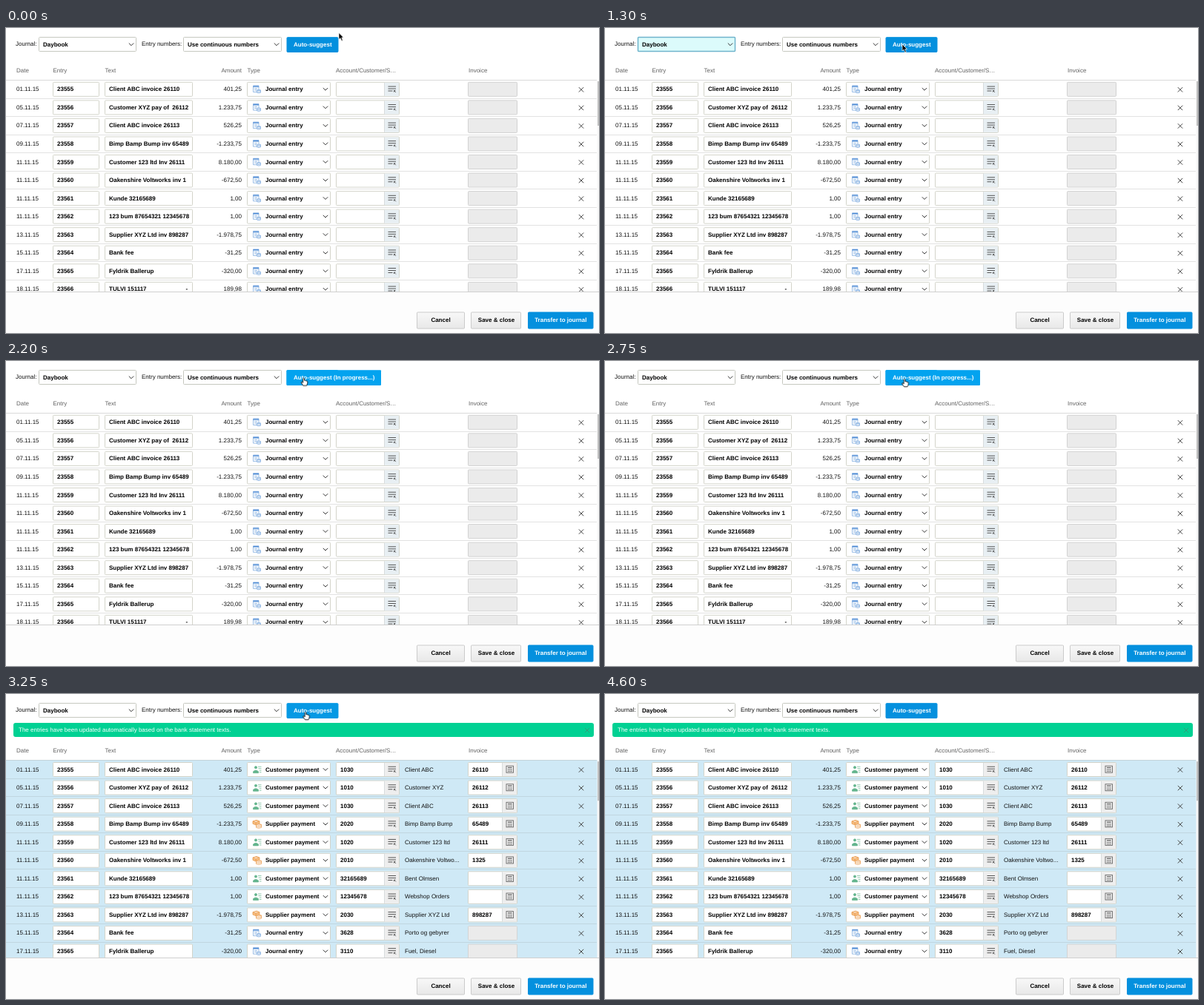
An HTML page for the animation above (4650 ms loop, 800x412 px).

```html
<!DOCTYPE html>
<html lang="en">
<head>
<meta charset="utf-8">
<title>Auto-suggest daybook entries</title>
<style>
  html, body { margin: 0; width: 100%; height: 100%; overflow: hidden; background: #fff; }
  svg { display: block; width: 800px; height: 412px; }
  text {
    font: 8px "Liberation Sans", Arial, sans-serif; fill: #111;
    white-space: pre; text-rendering: geometricPrecision;
  }
  .b { font-weight: bold; fill: #000; }
  .head { fill: #606060; }
  .white { fill: #fff; }
  .end { text-anchor: end; }
  .mid { text-anchor: middle; }
  .ln { fill: none; stroke: #333; }

  .before, .after, .focus, .button, .progress, .arrow, .hand {
    animation: 4650ms step-end infinite;
  }
  .before { animation-name: before; }
  .after { animation-name: after; }
  .focus { animation-name: focus; }
  .button { animation-name: button; }
  .progress { animation-name: progress; }
  .arrow { animation-name: arrow; }
  .hand { animation-name: hand; }
  .arrowPath { animation: arrowPath 4650ms linear infinite; }
  .handPath { animation: handPath 4650ms linear infinite; }

  @keyframes before { 0% { visibility: visible } 60.2%, 100% { visibility: hidden } }
  @keyframes after { 0% { visibility: hidden } 60.2%, 100% { visibility: visible } }
  @keyframes focus {
    0% { visibility: hidden } 12.9% { visibility: visible } 34.4%, 100% { visibility: hidden }
  }
  @keyframes button {
    0% { fill: #0490de; stroke: #0490de }
    30.1% { fill: #0599e4; stroke: #0599e4 }
    34.4% { fill: #38b8f0; stroke: #79cdf2 }
    44.08% { fill: #03a3ef; stroke: #03a3ef }
    60.2% { fill: #0599e4; stroke: #0599e4 }
    75%, 100% { fill: #0490de; stroke: #0490de }
  }
  @keyframes progress {
    0% { visibility: hidden } 44.08% { visibility: visible } 60.2%, 100% { visibility: hidden }
  }
  @keyframes arrow {
    0% { visibility: visible } 30.1% { visibility: hidden }
    75% { visibility: visible } 79%, 100% { visibility: hidden }
  }
  @keyframes hand {
    0% { visibility: hidden } 30.1% { visibility: visible } 75%, 100% { visibility: hidden }
  }
  @keyframes arrowPath {
    0% { transform: translate(449px, 6.5px) }
    12.9% { transform: translate(449px, 6.5px); animation-timing-function: ease-in-out }
    24%, 30.1% { transform: translate(401px, 22px) }
    75% { transform: translate(408px, 12px) }
    79%, 100% { transform: translate(412px, -16px) }
  }
  @keyframes handPath {
    0%, 48.4% { transform: translate(402px, 22.5px) }
    58%, 72% { transform: translate(404.5px, 24px) }
    75%, 100% { transform: translate(408px, 12px) }
  }
</style>
</head>
<body>
<svg id="stage" viewBox="0 0 800 412" xmlns="http://www.w3.org/2000/svg">
  <defs>
    <clipPath id="table"><rect y="40" width="800" height="316"/></clipPath>
    <linearGradient id="grey" x2="0" y2="1"><stop stop-color="#f8f8f8"/><stop offset="1" stop-color="#e8e8e8"/></linearGradient>
    <g id="journal" fill="#fff" stroke="#82aee0" stroke-width=".8">
      <path d="M.5 .5H8V9H.5ZM.5 2.4H8M2 4.5H6M2 6.5H5"/>
      <path d="M5.5 6.5V9.8Q8 11 10.5 9.8V6.5Q8 5.2 5.5 6.5Q8 7.8 10.5 6.5M5.5 8.2Q8 9.5 10.5 8.2"/>
      <path d="M.5 1.2H8" stroke="#4a88d4" stroke-width="1.2"/>
    </g>
    <g id="customer" fill="none" stroke="#62b48c" stroke-width=".7">
      <circle cx="4" cy="2.5" r="1.6" fill="#62b48c"/>
      <path d="M.5 10V8Q4 4.8 7.5 8V10Z" fill="#62b48c"/>
      <path d="M7 1.5H11.5M7.5 4H11.5M8.8 6.5H11.5M8.8 9H11.5"/>
    </g>
    <g id="supplier" fill="#fff" stroke="#ea9c50" stroke-width=".8">
      <path d="M0 1.5L5 0L9 1.5V5L4 6.5L0 5ZM0 1.5L4 3L9 1.5M4 3V6.5" fill="#f6bd80"/>
      <path d="M4.5 6V10Q8 11.8 11.5 10V6Q8 4.2 4.5 6Q8 7.8 11.5 6M4.5 8Q8 9.8 11.5 8"/>
    </g>
    <g id="list" fill="none" stroke="#444" stroke-width=".9">
      <path d="M0 0H10.5M0 3H10.5M0 6H6"/>
      <path d="M8 5.5L10.5 8M8 7.5V5.5H10" stroke-width=".8"/>
    </g>
    <g id="calc" fill="none" stroke="#666" stroke-width=".9">
      <rect width="9.5" height="9"/>
      <path d="M2 2.3H7.6" stroke-width="1.3"/>
      <path d="M2 5H7.6M2 7.2H7.6" stroke-width="1.2" stroke-dasharray="1.4 .7"/>
    </g>
  </defs>
</svg>
<script>
const rows = [
  ['01.11.15', 'Client ABC invoice 26110', '401,25', 'customer', '1030', 'Client ABC', '26110'],
  ['05.11.15', 'Customer XYZ pay of  26112', '1.233,75', 'customer', '1010', 'Customer XYZ', '26112'],
  ['07.11.15', 'Client ABC invoice 26113', '526,25', 'customer', '1030', 'Client ABC', '26113'],
  ['09.11.15', 'Bimp Bamp Bump inv 65489', '-1.233,75', 'supplier', '2020', 'Bimp Bamp Bump', '65489'],
  ['11.11.15', 'Customer 123 ltd Inv 26111', '8.180,00', 'customer', '1020', 'Customer 123 ltd', '26111'],
  ['11.11.15', 'Oakenshire Voltworks inv 1', '-672,50', 'supplier', '2010', 'Oakenshire Voltwo...', '1325'],
  ['11.11.15', 'Kunde 32165689', '1,00', 'customer', '32165689', 'Bent Olmsen', ''],
  ['11.11.15', '123 bum 87654321 12345678', '1,00', 'customer', '12345678', 'Webshop Orders', ''],
  ['13.11.15', 'Supplier XYZ Ltd inv 898287', '-1.978,75', 'supplier', '2030', 'Supplier XYZ Ltd', '898287'],
  ['15.11.15', 'Bank fee', '-31,25', 'journal', '3628', 'Porto og gebyrer'],
  ['17.11.15', 'Fyldrik Ballerup', '-320,00', 'journal', '3110', 'Fuel, Diesel'],
  ['18.11.15', 'TULVI 151117', '189,98', 'journal', '', '']
];
const labels = { journal: 'Journal entry', customer: 'Customer payment', supplier: 'Supplier payment' };

const text = (x, y, s, cls = '') => `<text x="${x}" y="${y + 2.8}" class="${cls}">${s.replace('&', '&amp;')}</text>`;
const rect = (x, y, w, h, fill, rest = '') => `<rect x="${x}" y="${y}" width="${w}" height="${h}" fill="${fill}" ${rest}/>`;
const box = (x, y, w, h, fill = '#fff', stroke = '#d3d4ca') =>
  rect(x + .5, y + .5, w - 1, h - 1, fill, `stroke="${stroke}" rx="1"`);
const icon = (id, x, y) => `<use href="#${id}" x="${x}" y="${y}"/>`;
const chevron = (x, y) => `<path class="ln" d="M${x - 3.2} ${y - 1.5}l3.2 3.2l3.2 -3.2"/>`;
const cross = (x, y, r, color) =>
  `<path d="M${x - r} ${y - r}l${2 * r} ${2 * r}m0 ${-2 * r}l${-2 * r} ${2 * r}" stroke="${color}"/>`;
const rule = (y, color) => rect(0, y, 797, 1, color);

function select(x, w, label) {
  return box(x, 12, w, 20, '#fff', '#c6c8c0') + text(x + 6, 22, label, 'b') + chevron(x + w - 7, 22);
}

function row(data, y, done) {
  const [date, note, amount, kind, account, name, invoice] = data;
  const type = done ? kind : 'journal';
  const top = y - 9.7;
  let out = text(14, y, date) +
    box(63, top, 63, 20) + text(69, y, String(23555 + rows.indexOf(data)), 'b') +
    box(133, top, 119, 20) + text(139, y, note, 'b') +
    text(318, y, amount, 'end') +
    box(325, top, 113, 20) + icon(type, 333, y - 5) + text(350, y, labels[type], 'b') + chevron(431, y) +
    box(445, top, 86, 20) + rect(511, top + 1, 19, 18, done ? '#eee' : '#e8eff3') +
    rect(510, top + 1, 1, 18, '#d8dcdd') + icon('list', 515.5, y - 3.5) +
    cross(776, y + .8, 3.2, '#444');
  if (note.startsWith('TULVI')) out += text(242.5, y, '-', 'b');
  if (!done) return out + box(623, top, 67, 20, '#ebebeb', '#d2d2d2');
  out += text(451, y, account, 'b') + text(538, y, name);
  if (invoice === undefined) return out + box(623, top, 67, 20, '#ebebeb', '#d2d4d5');
  return out + box(623, top, 67, 20) + rect(670, top + 1, 19, 18, '#eee') +
    rect(669, top + 1, 1, 18, '#d8dcdd') + icon('calc', 675, y - 4.5) + text(629, y, invoice, 'b');
}

function table(head, first, done) {
  const top = first - 12.5;
  let out = [[14, 'Date'], [63.5, 'Entry'], [133.5, 'Text'], [325.5, 'Type'], [445, 'Account/Customer/S…'], [624, 'Invoice']]
    .map(([x, s]) => text(x, head, s, 'head')).join('') + text(318, head, 'Amount', 'head end');
  if (done) out += rect(0, top, 798, 300, '#cfe9f6');
  out += rule(Math.round(top), done ? '#c3d3da' : '#dadada');
  rows.forEach((data, i) => {
    const y = first + i * 24.55;
    out += row(data, y, done) + rule(Math.round(y + 12), done ? '#c0d6e0' : '#e2e2e2');
  });
  return `<g class="${done ? 'after' : 'before'}" clip-path="url(#table)">${out}` +
    rect(797.5, top, 2.5, 290, '#f8f8f8') + rect(798, top + 2, 2, done ? 53 : 60, '#c2c2c2') + '</g>';
}

const banner = '<g class="after">' + rect(10, 39, 783, 19, '#00d193', 'rx="3"') +
  text(17, 48.3, 'The entries have been updated automatically based on the bank statement texts.', 'white') +
  cross(784, 49, 3, '#329c79') + '</g>';

const toolbar = text(13, 21.5, 'Journal:') + select(44, 132, 'Daybook') +
  '<g class="focus">' + rect(44.5, 12.5, 131, 19, '#dcfbfb', 'stroke="#6fb4cc" stroke-width="1.5" rx="1"') +
  text(50, 22, 'Daybook', 'b') + chevron(169, 22) + '</g>' +
  text(183, 21.5, 'Entry numbers:') + select(239, 133, 'Use continuous numbers') +
  rect(379, 12.7, 69, 19.8, '#0490de', 'class="button" rx="1"') +
  rect(378.5, 12.2, 127.5, 20.8, '#03a3ef', 'class="progress" rx="1"') +
  text(388, 22.3, 'Auto-suggest', 'b white') +
  '<g class="progress">' + text(441.8, 22.3, '(In progress...)', 'b white') + '</g>';

const footer = rect(0, 356, 800, 56, '#fdfdfd') + rect(0, 356, 800, 1, '#cfcfcf') +
  box(554, 383.5, 65, 23, 'url(#grey)', '#cbcbcb') + text(586.5, 394.5, 'Cancel', 'b mid') +
  box(627, 383.5, 68, 23, 'url(#grey)', '#cbcbcb') + text(661.5, 394.5, 'Save & close', 'b mid') +
  box(704, 383.5, 88.5, 23, '#0490de', '#0490de') + text(748.3, 394.5, 'Transfer to journal', 'b white mid');

const cursors = '<g class="arrow"><path class="arrowPath" d="M0 0V9L2.1 7.2L3.8 11L5.4 10.3L3.8 6.6H6.6Z" fill="#000" stroke="#fff" stroke-width=".7"/></g>' +
  '<g class="hand"><path class="handPath" d="M-1.3 5V1Q-.4 -.6 .5 1V3.8Q1.5 3.1 2 4.2Q3 3.5 3.5 4.6Q4.8 4.2 4.8 5.6V7.5L3.6 10.8H-1L-3.6 7Q-4 5.3 -2.4 5.8L-1.3 7Z" fill="#fff" stroke="#111" stroke-width=".9"/></g>';

document.getElementById('stage').insertAdjacentHTML('beforeend',
  table(57.5, 82.5, false) + table(76.5, 101.7, true) + banner + toolbar + footer + cursors);
</script>
</body>
</html>
```
